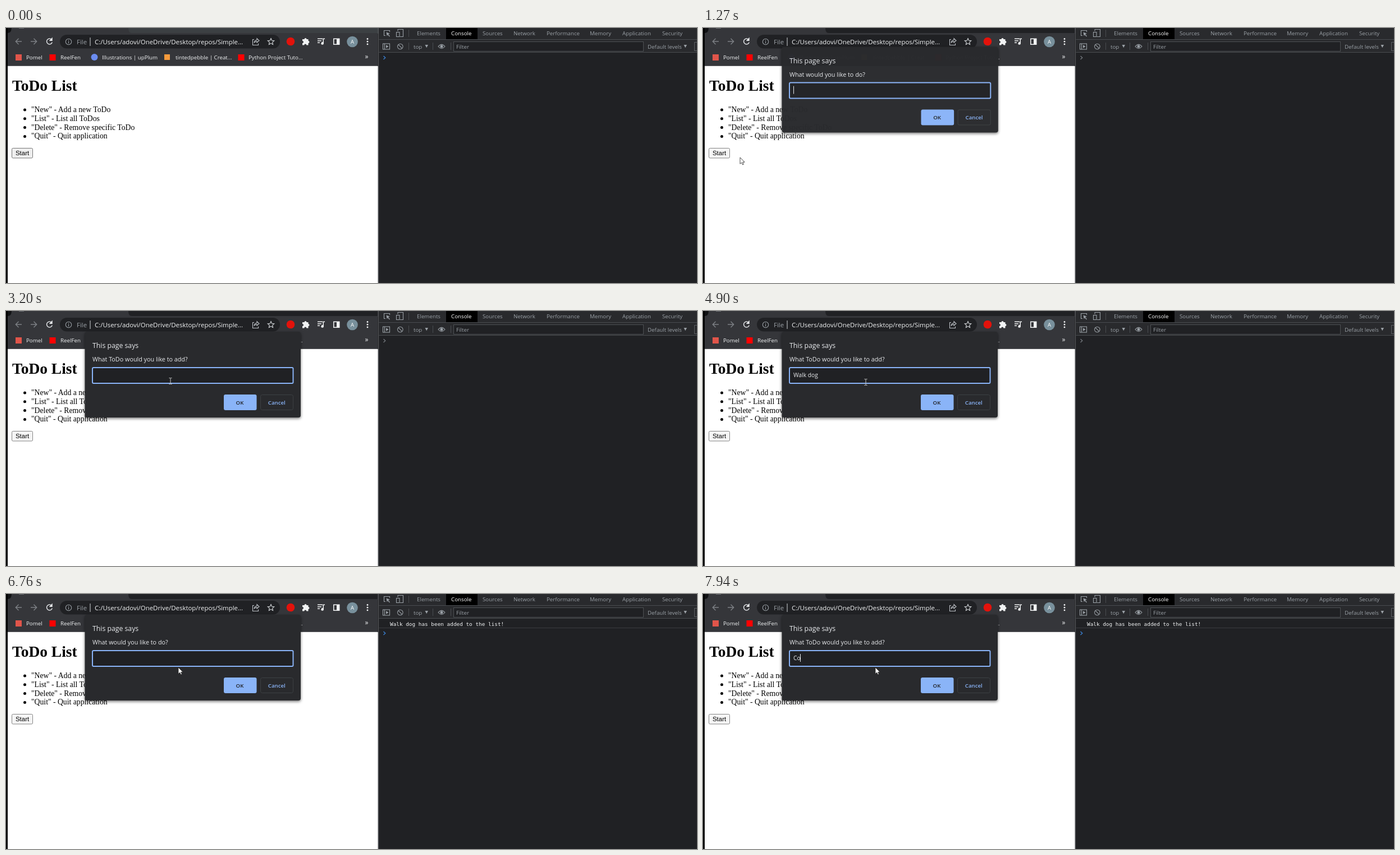
An HTML page that plays this animation: 1231x455 px, repeating every 8 s.

```html
<!DOCTYPE html>
<html lang="en">
<head>
<meta charset="utf-8">
<title>ToDo List</title>
<style>
  html, body { margin: 0; width: 100%; height: 100%; overflow: hidden; background: #000; }
  svg { display: block; width: 100vw; height: 100vh; }
  text { font-family: "Open Sans", "Noto Sans", sans-serif; white-space: pre; }
  .line { fill: none; stroke-width: 1.4; }
  .mark { font-size: 9.75px; fill: #f1f3f4; }
  .url { font-size: 11.43px; fill: #f1f3f4; }
  .tool { font-size: 9.75px; fill: #9aa0a6; }
  .page text { font: 13.71px "Liberation Serif", "Times New Roman", serif; }
  .page .title { font-size: 27.43px; font-weight: bold; }
  .page .start { font: 11.43px "Liberation Sans", Arial, sans-serif; }
  .log { font: 9.4px "DejaVu Sans Mono", monospace; fill: #f1f3f4; }
  .ask { font-size: 10.78px; fill: #e8eaed; }
  .typed { font-size: 10.3px; fill: #e8eaed; }
  .press { font-size: 9.7px; font-weight: 600; text-anchor: middle; }
  .panel { filter: drop-shadow(0 2px 2.5px rgba(0, 0, 0, .55)); }
</style>
</head>
<body>
<svg id="stage" viewBox="0 0 1231 455" preserveAspectRatio="none">
  <rect width="1231" height="455" fill="#000"/>

  <!-- browser window -->
  <rect id="strip" x="3" width="660" height="10" fill="#3c4043"/>
  <path d="M3 0H10Q10 9 3 9Z" fill="#111214"/>
  <path d="M10 0H218Q218 9 224 9H662V68H3V9Q10 9 10 0Z" fill="#35363a"/>
  <path d="M3 67.500H662" stroke="#5c5e61"/>
  <path d="M23 0H32" stroke="#a0a3a7"/>
  <rect x="96" y="12" width="392" height="24.5" rx="12.2" fill="#202124"/>
  <g class="line" stroke="#7d8085">
    <path d="M28 24H17.5M22.500 18.800L17.300 24L22.500 29.200"/>
    <path d="M44 24H54.500M49.500 18.800L54.700 24L49.500 29.200"/>
  </g>
  <g class="line" stroke="#e8eaed">
    <path d="M81.200 20.500A5 5 0 1 0 82.300 25.500"/>
    <path d="M78.300 22.200H82V18.300Z" fill="#e8eaed"/>
  </g>
  <g class="line" stroke="#9aa0a6" style="stroke-width:1.1">
    <circle cx="111.500" cy="24.500" r="5.200"/>
    <path d="M111.500 23.500V27.500M111.500 21.300V22.500"/>
    <path d="M150 17V32" stroke="#c4c7ca"/>
    <path d="M442 20.500H439.500V30.500H449.500V27.500M442 26.500Q443 21.500 447 21.500V18.500L451 22.500L447 26V23.700Q444 23.500 442 26.500Z" stroke="#bdc1c6"/>
    <path id="star" stroke="#d5d8db"/>
  </g>
  <text class="url" x="126" y="28.500" style="fill:#9aa0a6">File</text>
  <text class="url" x="158" y="28.500">C:/Users/adovi/OneDrive/Desktop/repos/Simple...</text>
  <circle cx="507" cy="24" r="7.300" fill="#e3120b"/>
  <g fill="#f1f3f4">
    <path d="M528 20H531.500A2 2 0 1 1 535.500 20H538.500V23A2 2 0 1 1 538.500 27V30.500H535.300A1.900 1.900 0 1 0 531.300 30.500H528V27A1.900 1.900 0 1 0 528 23Z"/>
    <path d="M555 18.500H564V20H555ZM555 22H562V23.500H555ZM555 25.500H559V27H555ZM564.500 18.500H568V20H566V27.500A2.300 2.300 0 1 1 564.500 25.300Z"/>
    <path d="M583 18.500H594.500V30H583ZM584.500 20V28.500H589V20Z" fill-rule="evenodd"/>
    <circle cx="644" cy="19.500" r="1.400"/><circle cx="644" cy="24.200" r="1.400"/><circle cx="644" cy="28.900" r="1.400"/>
  </g>
  <circle cx="617" cy="24.500" r="9.800" fill="#78909c"/>
  <text x="617" y="28" text-anchor="middle" font-size="9.500" fill="#fff">A</text>

  <rect x="17" y="47" width="11" height="11" fill="#e0554a"/>
  <rect x="77.500" y="47" width="11" height="11" fill="#f00"/>
  <circle cx="157.500" cy="52" r="6" fill="#6b8cf0"/>
  <rect x="282" y="47" width="10" height="10" fill="#f59a3c"/>
  <rect x="413.500" y="47" width="11" height="11" fill="#f00"/>
  <g class="mark">
    <text x="36" y="55.500">Pomel</text>
    <text x="97" y="55.500">ReelFen</text>
    <text x="171" y="55.500">Illustrations | upPlum</text>
    <text x="302" y="55.500">tintedpebble | Creat...</text>
    <text x="432" y="55.500">Python Project Tuto...</text>
    <text x="639.500" y="55" font-size="12">»</text>
  </g>

  <g class="page">
    <rect x="3" y="68" width="660" height="387" fill="#fff"/>
    <text class="title" x="11" y="112">ToDo List</text>
    <g id="list"></g>
    <rect id="start" x="10.500" y="214.500" width="37" height="17.500" rx="2" fill="#efefef" stroke="#767676"/>
    <text class="start" x="17" y="227">Start</text>
  </g>

  <!-- developer tools -->
  <rect x="662.500" width="2" height="455" fill="#55575a"/>
  <rect x="664.500" width="567" height="455" fill="#202124"/>
  <rect x="664.500" width="567" height="43" fill="#292a2d"/>
  <rect x="784" width="56" height="20" fill="#000"/>
  <path d="M664.500 20.500H1231M664.500 43.500H1231M717.500 3V16M717.500 26V39M760.500 26V39M792.500 26V39" stroke="#494c50"/>
  <rect x="797.500" y="24.500" width="338" height="17" fill="#202124" stroke="#4d5054"/>
  <rect x="1226.500" y="25.500" width="10" height="15" fill="none" stroke="#5a5d61"/>
  <g class="line" stroke="#9aa0a6" style="stroke-width:1.1">
    <path d="M676 13.500H673.500V4.500H683.500V7"/>
    <path d="M677.500 7.500L684 10L681 11L684 14.500L683 15.500L680 12L678.800 14.500Z" fill="#9aa0a6" stroke="none"/>
    <path d="M698 5.500V2.500H707.500V15.500H702"/><rect x="695.500" y="7.500" width="5.500" height="8"/>
    <rect x="671.500" y="28" width="12" height="10"/><path d="M674.500 28V38"/>
    <path d="M677 30.300L681.500 33L677 35.700Z" fill="#9aa0a6" stroke="none"/>
    <circle cx="702.300" cy="33" r="4.800"/><path d="M699 29.600L705.700 36.400"/>
    <path d="M770 33Q776 25.500 782 33Q776 40 770 33Z"/><circle cx="776" cy="32.700" r="2" fill="#9aa0a6"/>
  </g>
  <g class="tool">
    <g id="tabs"></g>
    <text x="726" y="36.500">top</text><text x="802" y="36.800">Filter</text>
    <text x="1143" y="36.500">Default levels</text>
    <path d="M746.500 30H752L749.200 35.300ZM1207.500 30H1213L1210.200 35.300Z"/>
  </g>
  <g id="message">
    <text class="log" x="684" y="57">Walk dog has been added to the list!</text>
    <path d="M664.500 60.500H1231" stroke="#3a3c40"/>
  </g>
  <path id="chevron" d="M672.500 50L675.800 53L672.500 56" fill="none" stroke-width="1.300"/>

  <g id="dialogs"></g>
  <path id="arrow" d="M0 0V11.500L2.700 9L4.500 13L6.400 12.200L4.700 8.300H8.200Z" fill="#fff" stroke="#222" stroke-width=".8"/>
  <path id="beam" d="M-2.500 -5.500H-.7L0 -4.800L.7 -5.500H2.500M0 -4.800V4.800M-2.500 5.500H-.7L0 4.800L.7 5.500H2.500" fill="none" stroke="#c8c8c8"/>
</svg>
<script>
const LOOP = 8000, BLINK = 530, OPEN = 220, CLOSE = 150;
const WHAT = "What would you like to do?", ADD = "What ToDo would you like to add?";
const $ = id => document.getElementById(id);
const clamp = v => Math.max(0, Math.min(1, v));
const easeOut = p => 1 - (1 - p) ** 3;

$("star").setAttribute("d", "M" + Array.from({ length: 10 }, (_, i) => {
  const a = i * Math.PI / 5, r = i % 2 ? 2.8 : 6;
  return `${472 + r * Math.sin(a)} ${24.5 - r * Math.cos(a)}`;
}).join("L") + "Z");

$("list").innerHTML = ['"New" - Add a new ToDo', '"List" - List all ToDos',
  '"Delete" - Remove specific ToDo', '"Quit" - Quit application'].map((s, i) => {
  const y = 150 + i * 15.8;
  return `<circle cx="33.500" cy="${y - 4}" r="2.500"/><text x="45" y="${y}">${s}</text>`;
}).join("");

$("tabs").innerHTML = Object.entries({ Elements: 732, Console: 793, Sources: 849, Network: 904,
  Performance: 963, Memory: 1040, Application: 1098, Security: 1169 }).map(([name, x]) =>
  `<text x="${x}" y="13"${name === "Console" ? ' fill="#fff"' : ""}>${name}</text>`).join("");

// open: first visible moment; caret: start of the blink; keys: when each letter lands
const dialogs = [
  { open: 1210, caret: 1080, ask: WHAT, text: "new", keys: [2440, 2510, 2570] },
  { open: 2630, caret: 2670, ask: ADD, text: "Walk dog", keys: [3230, 3430, 3710, 3800, 3900, 4000, 4130, 4270] },
  { open: 5320, caret: 5160, ask: WHAT, text: "new", keys: [6820, 6880, 6940] },
  { open: 6985, caret: 7000, ask: ADD, text: "Co", keys: [7630, 7940] }
];

$("dialogs").innerHTML = dialogs.map(d => `<g>
  <rect class="panel" x="140.500" y="37" width="384.500" height="153" rx="4" fill="#292a2d"/>
  <text x="154" y="66" font-size="12.250" fill="#e8eaed">This page says</text>
  <text class="ask" x="154" y="90">${d.ask}</text>
  <rect x="154" y="101" width="357.500" height="28" rx="2" fill="#202124" stroke="#8ab4f8" stroke-width="2"/>
  <text class="typed" x="161" y="118"></text>
  <rect class="bar" y="107" width="1" height="14" fill="#e8eaed"/>
  <rect x="388" y="149" width="58.500" height="28" rx="3" fill="#8ab4f8"/>
  <text class="press" x="416.500" y="166.500" fill="#202124">OK</text>
  <rect x="453.500" y="149.500" width="58" height="27" rx="3" fill="none" stroke="#3c4043"/>
  <text class="press" x="482.300" y="166.500" fill="#8ab4f8">Cancel</text></g>`).join("");

dialogs.forEach((d, i) => {
  d.node = $("dialogs").children[i];
  d.typed = d.node.querySelector(".typed");
  d.bar = d.node.querySelector(".bar");
  d.close = i + 1 < dialogs.length ? dialogs[i + 1].open - 40 : Infinity;
});

const pen = document.createElement("canvas").getContext("2d");
pen.font = '10.3px "Open Sans", "Noto Sans", sans-serif';

// time, x, y of the pointer
const path = [
  [190, 1109, 441], [300, 985, 432], [500, 600, 362], [700, 200, 270], [850, 62, 234], [950, 32, 223],
  [1050, 32, 223], [1150, 40, 227], [1270, 65, 231], [1450, 165, 205], [1650, 268, 143], [1840, 292, 124],
  [1940, 293, 125], [4780, 293, 125], [5000, 288, 129], [5370, 282, 131], [5550, 284, 130],
  [5650, 287, 126], [5770, 299, 102], [5990, 307, 131]
];

function pointer(t) {
  const i = path.findIndex(p => p[0] > t);
  if (i < 0) return path[path.length - 1].slice(1);
  const [t0, x0, y0] = path[i - 1], [t1, x1, y1] = path[i], p = (t - t0) / (t1 - t0);
  return [x0 + (x1 - x0) * p, y0 + (y1 - y0) * p];
}

function drawDialog(d, t) {
  const shown = t >= d.open && t < d.close + CLOSE;
  d.node.style.display = shown ? "" : "none";
  if (!shown) return;
  const p = clamp((t - d.open) / OPEN), q = clamp((t - d.close) / CLOSE);
  const y = -9 * (1 - easeOut(p)) - 13 * easeOut(q);
  const grow = 1 + .003 * (1 - p);
  d.node.setAttribute("transform", `translate(${154 * (1 - grow)} ${y}) scale(${grow} 1)`);
  d.node.setAttribute("opacity", Math.min(1, .3 + 2.45 * p) * (1 - q));

  const count = d.keys.filter(k => k <= t).length;
  const value = d.text.slice(0, count);
  const since = count ? d.keys[count - 1] : d.caret;
  d.typed.textContent = value;
  d.bar.setAttribute("x", 161 + Math.floor(pen.measureText(value).width));
  d.bar.style.display = t < since || Math.floor((t - since) / BLINK) % 2 === 0 ? "" : "none";
}

function drawPointer(t) {
  const visible = t >= 190, [x, y] = visible ? pointer(t) : [0, 0];
  const inField = t > 1210 && x > 153 && x < 513 && y > 100 && y < 130;
  for (const [id, on] of [["arrow", visible && !inField], ["beam", visible && inField]]) {
    $(id).style.display = on ? "" : "none";
    $(id).setAttribute("transform", `translate(${Math.round(x)} ${Math.round(y)})`);
  }
}

function draw(t) {
  const clicked = t >= 1050, logged = t >= 5290;
  $("strip").setAttribute("fill", clicked ? "#202124" : "#3c4043");
  $("start").setAttribute("fill", clicked ? "#f5f5f5" : t > 900 ? "#e5e5e5" : "#efefef");
  $("start").setAttribute("stroke", clicked ? "#858585" : t > 900 ? "#4f4f4f" : "#767676");
  $("message").style.display = logged ? "" : "none";
  $("chevron").setAttribute("transform", `translate(0 ${logged ? 17 : 0})`);
  $("chevron").setAttribute("stroke", clicked && !logged ? "#74797f" : "#3b82d6");
  dialogs.forEach(d => drawDialog(d, t));
  drawPointer(t);
}

const begin = performance.now();
function tick() {
  draw((performance.now() - begin) % LOOP);
  requestAnimationFrame(tick);
}
tick();
</script>
</body>
</html>
```
